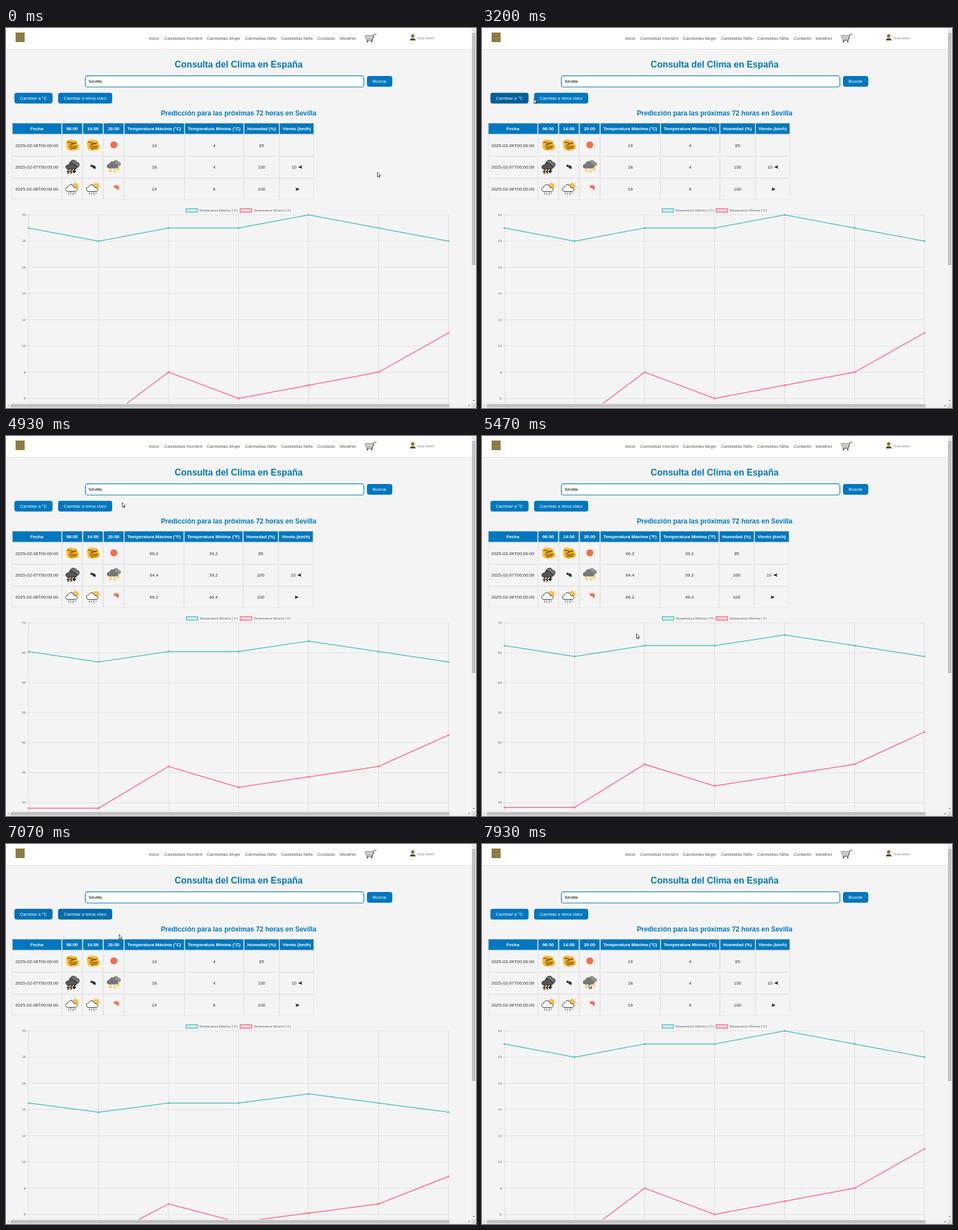
An HTML page that plays this animation: 832 px wide and 673 px high, repeating every 8000 ms.

```html
<!DOCTYPE html>
<html lang="es">
<head>
<meta charset="utf-8">
<title>Consulta del Clima</title>
<style>
html, body { margin: 0; width: 100%; height: 100%; overflow: hidden; background: #f4f4f4 }
svg { display: block; font-family: "Liberation Sans", Arial, sans-serif }
text { white-space: pre }
</style>
</head>
<body>
<svg id="stage" width="832" height="673" viewBox="0 0 832 673">
  <defs>
    <g id="haze">
      <path d="M-11-3C-10-10-2-11 2-8C7-9 9-5 9-2C13 1 13 7 9 8C4 11-6 11-9 7C-11 4-9 1-11-3z" fill="#fbb829"/>
      <path d="M-8-5L4-2M-5 1L7-4M-5 4L8 2M-3 7L7 5" fill="none" stroke="#6b4a1c" stroke-width="1.5" stroke-linecap="round"/>
    </g>
    <circle id="sun" r="6.2" fill="#f26f4c"/>
    <path id="comma" d="M0-4C0-7 9-7 9-2C9 1 8 3 6 2C5 0 5-1 2-1C0-1 0-3 0-4z" fill="#f26f4c"/>
    <g id="storm" stroke="#222" stroke-width="1">
      <path d="M-5-4C-5-13 6-14 7-8C13-9 14-1 9 1H-3z" fill="#777"/>
      <path d="M-9 4C-14 2-11-4-7-3C-5-9 3-8 4-3C9-4 10 4 5 4z" fill="#555"/>
      <path d="M-5 4L-8 8H-5L-8 12M0 4L-3 8H0L-3 12M5 4L2 8H5L2 11" fill="none" stroke="#222" stroke-width="2.2"/>
      <path d="M-5 5L-7 8H-4L-7 11M0 5L-2 8H1L-2 11" fill="none" stroke="#f5a033"/>
    </g>
    <path id="bit" d="M-5-3L-3-4 0-2 2-3 5 1 4 4 1 3-1 1-4 0z" fill="#333"/>
    <g id="thunder">
      <path d="M-3-4C-2-13 6-14 8-9C14-9 14-1 9-1H-1z" fill="#929292"/>
      <path d="M-9 3C-15 1-12-6-8-5C-6-12 2-11 3-5C9-6 10 3 4 3z" fill="#777"/>
      <path d="M-6 3L-9 8H-6L-8 13-3 6H-6L-4 3zM8 0L5 5H8L6 10 11 4H8L10 0zM1 5L-1 9H1L0 12 4 8H2L3 5z" fill="#fdc43b"/>
    </g>
    <g id="shower" stroke="#222" stroke-width="1">
      <path d="M5-13V-11M-2-10L-1-8M11-10L10-8M12-3H14M10 3L11 4" stroke="#f5a623"/>
      <circle cx="5" cy="-4" r="5" fill="#fdc44a" stroke="#d9901c"/>
      <path d="M-8 5C-14 4-12-3-8-3C-6-9 2-8 3-2C10-3 10 5 5 5z" fill="#fff"/>
      <path d="M-6 7L-7 10M-2 7L-3 9M2 7L1 10M6 7L5 9M-3 11V12M2 11V12" fill="none"/>
    </g>
    <path id="wind" d="M-3.5-3L4 0-3.5 3-2 0z" fill="#222"/>
  </defs>
  <g id="page"></g>
  <g id="forecast"></g>
  <g id="chart"></g>
  <g id="scrollbars">
    <path d="M824 0H832V673H0V665H824z" fill="#f1f1f1"/>
    <path d="M824 665H832V673H824z" fill="#dcdcdc"/>
    <path d="M825 8.5H831V420H825zM8.500 666H785V672H8.500z" fill="#c1c1c1"/>
    <path d="M826.500 5.200L828 3.300 829.500 5.200z" fill="#a3a3a3"/>
    <path d="M826.500 659L828 661 829.500 659zM818.800 667.300L820.800 668.800 818.800 670.300z" fill="#505050"/>
    <path d="M5 667.300L3.200 668.800 5 670.300z" fill="#777"/>
  </g>
  <path id="cursor" d="M.5 .5V8.800L2.400 7 3.700 9.800 4.900 9.200 3.600 6.500H6z" fill="#fff" stroke="#111" stroke-width=".8"/>
</svg>
<script>
const $ = id => document.getElementById(id);
const BLUE = '#0077be', SIZE = 7.93, LOOP = 8000, STEP = 1000 / 15;
const TO_F = 4340, TO_C = 6800;

const text = (x, y, s, { size = SIZE, fill = '#333', anchor = 'start', bold } = {}) =>
  `<text x="${x}" y="${y}" font-size="${size}" fill="${fill}" text-anchor="${anchor}"${bold ? ' font-weight="700"' : ''}>${s}</text>`;
const centered = (x, y, s, options) => text(x, y, s, { anchor: 'middle', ...options });
const rect = (x, y, w, h, fill, extra = '') =>
  `<rect x="${x}" y="${y}" width="${w}" height="${h}" fill="${fill}" ${extra}/>`;
const icon = (id, x, y, turn = 0) => `<use href="#${id}" transform="translate(${x} ${y}) rotate(${turn})"/>`;
const button = (id, x, y, w, label) =>
  rect(x, y, w, 19, BLUE, `rx="4" id="${id}"`) + centered(x + w / 2, y + 12.2, label, { fill: '#fff' });

function drawPage() {
  const nav = [['Inicio', 253], ['Camisetas Hombre', 280], ['Camisetas Mujer', 355.5], ['Camisetas Niño', 423],
    ['Camisetas Niña', 487], ['Contacto', 551], ['Weather', 590.5]];
  $('page').innerHTML = rect(0, 0, 824, 37.5, '#fff') + rect(0, 37.3, 824, .8, '#ddd')
    + rect(17, 8, 16, 17, '#8d7c45')
    + nav.map(([label, x]) => text(x, 21.3, label, { fill: '#555' })).join('')
    + `<path d="M635.500 13H651L649 20H638z" fill="#ccc" stroke="#777" stroke-width=".8"/>
       <path d="M656 10.500L651.500 11.500 648.500 22H638" fill="none" stroke="#444"/>
       <circle cx="640" cy="24" r="1.400" fill="#444"/><circle cx="647.500" cy="24" r="1.400" fill="#444"/>
       <circle cx="720" cy="14" r="3" fill="#85702f"/>
       <path d="M715 22C715 16.500 725 16.500 725 22z" fill="#5b4b1e"/>`
    + text(728, 20.3, 'Iniciar Sesión', { size: 5, fill: '#777' })
    + centered(411.8, 69.5, 'Consulta del Clima en España', { size: 15.86, fill: BLUE, bold: true })
    + rect(140.5, 84.7, 493, 19.8, '#fff', `rx="4" stroke="${BLUE}" stroke-width="1.2"`)
    + text(146, 97.2, 'Sevilla', { fill: '#000' })
    + button('search', 639, 85, 44.8, 'Buscar')
    + button('unit', 14.9, 114.8, 67.5, 'Cambiar a °C')
    + button('theme', 92.2, 114.8, 95.8, 'Cambiar a tema claro')
    + centered(411.8, 154.6, 'Predicción para las próximas 72 horas en Sevilla', { size: 11.89, fill: BLUE, bold: true });
}

const highs = [19, 18, 19, 19, 20, 19, 18], lows = [4, 4, 8, 6, 7, 8, 11];
const toUnit = (celsius, hot) => hot ? +(celsius * 1.8 + 32).toFixed(1) : celsius;

function drawForecast(hot) {
  const edges = [11, 99.2, 136, 172.7, 209.5, ...(hot ? [315.6, 420, 482.6, 544.3] : [316.5, 421.5, 484.3, 545.8])];
  const mid = i => (edges[i] + edges[i + 1] - 1) / 2;
  const unit = hot ? '°F' : '°C';
  const heads = ['Fecha', '08:00', '14:00', '20:00', `Temperatura Máxima (${unit})`, `Temperatura Mínima (${unit})`,
    'Humedad (%)', 'Viento (km/h)'];
  const rows = [[19, 4, 85, 'haze haze sun'], [18, 4, 100, 'storm bit thunder'], [19, 8, 100, 'shower shower comma']];
  const border = 'stroke="#ddd" stroke-width=".6"';
  let out = heads.map((head, i) => rect(edges[i] + .2, 168.7, edges[i + 1] - edges[i] - 1.2, 19.2, BLUE, border)
    + centered(mid(i), 181.1, head, { fill: '#fff', bold: true })).join('');
  rows.forEach(([high, low, humidity, icons], r) => {
    const y = 207.7 + r * 38.8;
    heads.forEach((_, i) => out += rect(edges[i] + .2, y - 18.7, edges[i + 1] - edges[i] - 1.2, 37.5, 'none', border));
    out += centered(mid(0), y + 2.8, `2025-02-0${6 + r}T00:00:00`);
    icons.split(' ').forEach((id, i) => out += icon(id, mid(i + 1) + .3, y - .7));
    [toUnit(high, hot), toUnit(low, hot), humidity].forEach((v, i) => out += centered(mid(i + 4), y + 2.8, v));
  });
  out += text(mid(7) - 9.1, 249.3, '10') + icon('wind', mid(7) + 6.5, 246.3, 180) + icon('wind', mid(7) + 1.4, 285.5);
  $('forecast').innerHTML = out;
}

const TOP = 331, BASE = 702.4, LEFT = 40, GAP = 123.9;

function drawChart(hot, grow) {
  const [min, max, tick] = hot ? [35, 70, 5] : [4, 20, 2];
  const scale = v => BASE - (v - min) / (max - min) * (BASE - TOP);
  const unit = hot ? '°F' : '°C', shift = hot ? .4 : 0;
  const small = { size: 5.95, fill: '#666' };
  let grid = '', out = '';
  for (let v = min; v <= max; v += tick) {
    grid += `M36 ${scale(v)}H783.500`;
    out += text(34.8, scale(v) + 2, v, { ...small, anchor: 'end' });
  }
  for (let i = 0; i < 7; i++) grid += `M${LEFT + i * GAP} ${TOP}V${BASE}`;
  out += `<path d="${grid}" stroke="#000" stroke-opacity=".12" stroke-width=".7"/>`;
  [['Máxima', highs, '#4bc0c0', 318.8], ['Mínima', lows, '#ff6384', 414.5]].forEach(([name, data, color, x]) => {
    x += name == 'Máxima' ? shift : 0;
    const points = data.map((v, i) => [LEFT + i * GAP, BASE + (scale(toUnit(v, hot)) - BASE) * grow]);
    out += rect(x, 320, 20.3, 6.2, color, `fill-opacity=".2" stroke="${color}" stroke-width="1.4"`)
      + text(x + 23.3, 324.7, `Temperatura ${name} (${unit})`, small)
      + `<polyline points="${points.join(' ')}" fill="none" stroke="${color}" stroke-width="1.5"/>`
      + points.map(([cx, cy]) => `<circle cx="${cx}" cy="${cy}" r="1.500" fill="${color}" fill-opacity=".3" stroke="${color}" stroke-width=".7"/>`).join('');
  });
  $('chart').innerHTML = out;
}

// Pointer stops: time, x, y
const stops = [[0, 657, 255], [20, 657, 255], [133, 747, 297], [1200, 815, 39], [1333, 782, 66], [1467, 782, 66],
  [1933, 378, 256], [2200, 127, 176], [2400, 285, 200], [2867, 70, 125], [3070, 62, 126], [3200, 91.5, 125],
  [3470, 140, 130], [3670, 88, 132], [3870, 50, 128], [4400, 50, 126], [4600, 103, 160], [4930, 205, 118],
  [5000, 210, 109], [5467, 273, 350], [5800, 488, 308], [6600, 40, 122], [6800, 45, 124], [7067, 200, 160],
  [7533, 215, 117], [7933, 189, 247]];
const clamp = v => Math.max(0, Math.min(1, v));

function pointerAt(t) {
  const i = stops.findIndex(s => s[0] > t);
  if (i < 0) return stops.at(-1).slice(1);
  const [a, b] = [stops[i - 1], stops[i]];
  const p = (t - a[0]) / (b[0] - a[0]);
  return [a[1] + (b[1] - a[1]) * p, a[2] + (b[2] - a[2]) * p];
}

const hovers = { unit: [[2840, 3170], [3690, 4530], [6560, 6870]], theme: [[3200, 3650], [6420, 6540], [6890, 6990]] };

function paintHover(id, t) {
  const level = hovers[id].reduce((sum, [on, off]) => sum + clamp((t - on) / 250) - clamp((t - off) / 250), 0);
  const mix = (a, b) => Math.round(a + (b - a) * clamp(level));
  $(id).setAttribute('fill', `rgb(0,${mix(119, 91)},${mix(190, 148)})`);
}

let shownUnit, shownGrow;
function frame(now) {
  const t = Math.floor((now % LOOP + 5) / STEP) * STEP;
  const hot = t >= TO_F && t < TO_C;
  const start = hot ? TO_F + 14 : t >= TO_C ? TO_C + 7 : -LOOP;
  const grow = 1 - (1 - clamp((t - start) / 1000)) ** 4;
  if (hot !== shownUnit) drawForecast(hot);
  if (hot !== shownUnit || grow !== shownGrow) drawChart(hot, grow);
  [shownUnit, shownGrow] = [hot, grow];
  paintHover('unit', t);
  paintHover('theme', t);
  $('cursor').setAttribute('transform', `translate(${pointerAt(t)})`);
  $('cursor').setAttribute('visibility', t > 190 && t < 1199 ? 'hidden' : 'visible');
  requestAnimationFrame(frame);
}

drawPage();
requestAnimationFrame(frame);
</script>
</body>
</html>
```
